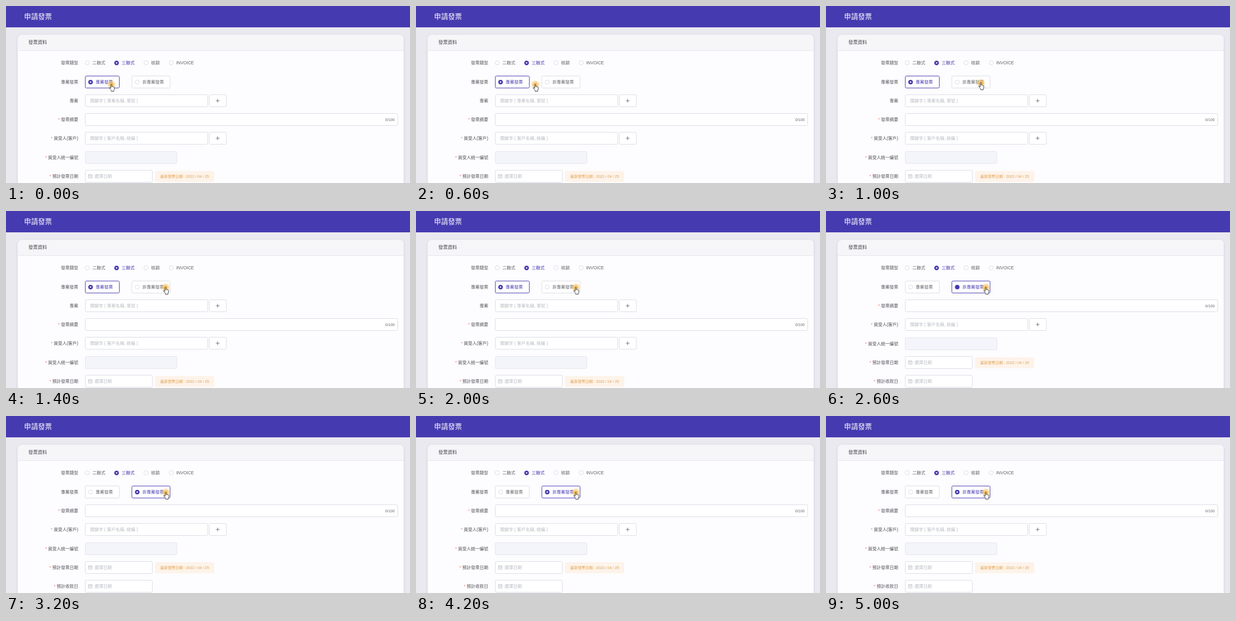
Write an HTML page that moves like this. It is 772 px wide and 340 px high and loops after 5200 ms.

```html
<!DOCTYPE html>
<html lang="zh-Hant">
<head>
<meta charset="utf-8">
<title>申請發票</title>
<style>
  html, body { margin: 0; width: 100%; height: 100%; overflow: hidden; background: #ebe9f0; }
  svg { display: block; width: 772px; height: 340px; }
  text {
    font: 8.25px "Liberation Sans", "Noto Sans CJK TC", "Noto Sans CJK", sans-serif;
    fill: #606266;
    white-space: pre;
  }
  .title { font-size: 13.3px; font-weight: 500; fill: #fff; }
  .heading { font-size: 8.9px; fill: #45464c; }
  .label { text-anchor: end; fill: #515359; }
  .star { fill: #ee8070; }
  .hint { fill: #b9bcc5; }
  .small { font-size: 7.2px; }
  .notice { fill: #dfa04e; }
  .chosen { fill: #463ab0; }
  .field { fill: #fff; stroke: #dadce5; }
  .locked { fill: #f4f5fa; stroke: #e4e6ee; }
  .ring { fill: #fff; stroke: #dadce5; }
  .bullet { fill: #463ab0; }
  .plus { stroke: #70727a; fill: none; }
  .icon { stroke: #b9bcc5; fill: none; stroke-width: .8; }

  .option rect { fill: #fff; stroke: var(--edge); }
  .option .ring { fill: var(--disc); stroke: var(--edge); }
  .option text { fill: var(--ink); }

  .move, .option, .old, .dot-in { animation: 5200ms step-end infinite; }
  #project { animation-name: release; }
  #other { animation-name: pick; }
  .old { animation-name: vanish; }
  .dot-in { animation-name: appear; }
  #rows { animation-name: lift; }
  #pointer { animation-name: glide; }

  @keyframes release {
    0% { --edge: #463ab0; --disc: #463ab0; --ink: #463ab0; }
    50%, 100% { --edge: #dadce5; --disc: #fff; --ink: #606266; }
  }
  @keyframes pick {
    0% { --edge: #dadce5; --disc: #fff; --ink: #606266; }
    50%, 100% { --edge: #463ab0; --disc: #463ab0; --ink: #463ab0; }
  }
  @keyframes vanish {
    0% { visibility: visible; }
    50%, 100% { visibility: hidden; }
  }
  @keyframes appear {
    0% { visibility: hidden; }
    53.846%, 100% { visibility: visible; }
  }
  @keyframes lift {
    0% { transform: translateY(0); }
    50%, 100% { transform: translateY(-36px); }
  }
  @keyframes glide {
    0% { transform: translate(201.5px, 151px); }
    7.692% { transform: translate(195px, 151px); }
    11.538% { transform: translate(228px, 151px); }
    15.385% { transform: translate(286px, 151px); }
    19.231% { transform: translate(296px, 148px); }
    23.077% { transform: translate(304px, 147px); }
    26.923% { transform: translate(305px, 147px); }
    38.462%, 100% { transform: translate(305.5px, 147px); }
  }
</style>
</head>
<body>
<svg viewBox="0 0 772 340">
  <defs>
    <radialGradient id="glow">
      <stop offset="0" stop-color="#f5ac2e" stop-opacity=".9"/>
      <stop offset=".5" stop-color="#f8bd55" stop-opacity=".72"/>
      <stop offset="1" stop-color="#fbd48c" stop-opacity="0"/>
    </radialGradient>
    <filter id="shade" x="-5%" y="-5%" width="110%" height="110%">
      <feDropShadow dx="0" dy="1" stdDeviation="2" flood-color="#3a3560" flood-opacity=".16"/>
    </filter>
    <!-- Shared parts, centred on y = 0 -->
    <g id="search">
      <rect class="field" x="151.5" y="-11.5" width="234" height="23" rx="2"/>
      <rect class="field" x="388.5" y="-11.5" width="32.5" height="23" rx="2"/>
      <path class="plus" d="M401 0h7M404.5 -3.5v7"/>
    </g>
    <g id="date">
      <rect class="field" x="151.5" y="-11.5" width="128" height="23" rx="2"/>
      <path class="icon" d="M157.5 -3h7v6.5h-7zM157.5 -.9h7M159.3 -4.2v2M162.7 -4.2v2M159 1.2h4"/>
      <text class="hint" x="169.3" y="3.1">選擇日期</text>
    </g>
  </defs>

  <rect width="772" height="340" fill="#ebe9f0"/>
  <rect width="772" height="41" fill="#463ab0"/>
  <text class="title" x="34.6" y="25.2">申請發票</text>

  <rect x="22.5" y="55.5" width="737.5" height="320" rx="8" fill="#fdfcfe" filter="url(#shade)"/>
  <path d="M22.5 85V63.500a8 8 0 0 1 8-8h721.500a8 8 0 0 1 8 8V85z" fill="#f6f5f8"/>
  <path d="M22.500 85.500h737.500" stroke="#e6e5ec"/>
  <text class="heading" x="42.800" y="73.400">發票資料</text>

  <g transform="translate(0 109)">
    <text class="label" x="138" y="3.1">發票類型</text>
    <circle class="ring" cx="155.2" r="4"/>
    <text x="165" y="3.1">二聯式</text>
    <circle class="bullet" cx="211.3" cy=".3" r="4.4"/>
    <circle cx="211.3" cy=".3" r="1.4" fill="#fff"/>
    <text class="chosen" x="221" y="3.1">三聯式</text>
    <circle class="ring" cx="267.7" r="4"/>
    <text x="277.3" y="3.1">核銷</text>
    <circle class="ring" cx="315.7" r="4"/>
    <text x="325.2" y="3.1">INVOICE</text>
  </g>

  <g transform="translate(0 146)">
    <text class="label" x="138" y="3.1">專案發票</text>
    <g class="option" id="project">
      <rect x="151.5" y="-11.5" width="65" height="23" rx="2"/>
      <circle class="ring" cx="161.6" cy=".2" r="4"/>
      <circle class="old" cx="161.6" cy=".2" r="1.4" fill="#fff"/>
      <text x="171.3" y="3.1">專案發票</text>
    </g>
    <g class="option" id="other">
      <rect x="240.5" y="-11.5" width="73" height="23" rx="2"/>
      <circle class="ring" cx="250.8" cy=".2" r="4"/>
      <circle class="dot-in" cx="250.8" cy=".2" r="1.4" fill="#fff"/>
      <text x="260.5" y="3.1">非專案發票</text>
    </g>
  </g>

  <g class="move" id="rows">
    <g class="old" transform="translate(0 182)">
      <text class="label" x="138" y="3.1">專案</text>
      <use href="#search"/>
      <text class="hint" x="160.8" y="3.1">關鍵字 ( 專案名稱, 單號 )</text>
    </g>
    <g transform="translate(0 218)">
      <text class="label" x="138" y="3.1"><tspan class="star">* </tspan>發票摘要</text>
      <rect class="field" x="151.5" y="-11.5" width="597" height="23" rx="2"/>
      <text class="small" x="724.8" y="2.8">0/100</text>
    </g>
    <g transform="translate(0 254)">
      <text class="label" x="138" y="3.4"><tspan class="star">* </tspan>買受人(客戶)</text>
      <use href="#search"/>
      <text class="hint" x="160.8" y="3.4">關鍵字 ( 客戶名稱, 統編 )</text>
    </g>
    <g transform="translate(0 291)">
      <text class="label" x="138" y="3"><tspan class="star">* </tspan>買受人統一編號</text>
      <rect class="locked" x="151.5" y="-11.5" width="175" height="23" rx="2"/>
    </g>
    <g transform="translate(0 327)">
      <text class="label" x="138" y="3.1"><tspan class="star">* </tspan>預計發票日期</text>
      <use href="#date"/>
      <rect x="285" y="-10" width="113" height="21" rx="2.5" fill="#fdf3ea"/>
      <text class="small notice" x="294.8" y="3">最新發票日期 : 2022 / 04 / 25</text>
    </g>
    <g transform="translate(0 363)">
      <text class="label" x="138" y="3.1"><tspan class="star">* </tspan>預計收款日</text>
      <use href="#date"/>
    </g>
  </g>

  <g class="move" id="pointer">
    <circle r="9" fill="url(#glow)"/>
    <path transform="translate(-4.4 -1) scale(.63)" fill="#fff" stroke="#222" stroke-width="1.5" stroke-linejoin="round"
      d="M5 13V2a1.600 1.600 0 0 1 3.200 0v6c.6-1 2.600-.8 2.800.4 .8-.7 2.300-.4 2.500.7 1-.4 2.300 0 2.300 1.400v4.500c0 2-1.600 3-1.600 5v2H6.500v-2C5.500 18 3 15 1 12.600c-1-1.400.7-2.800 2-1.800z"/>
  </g>
</svg>
</body>
</html>
```
